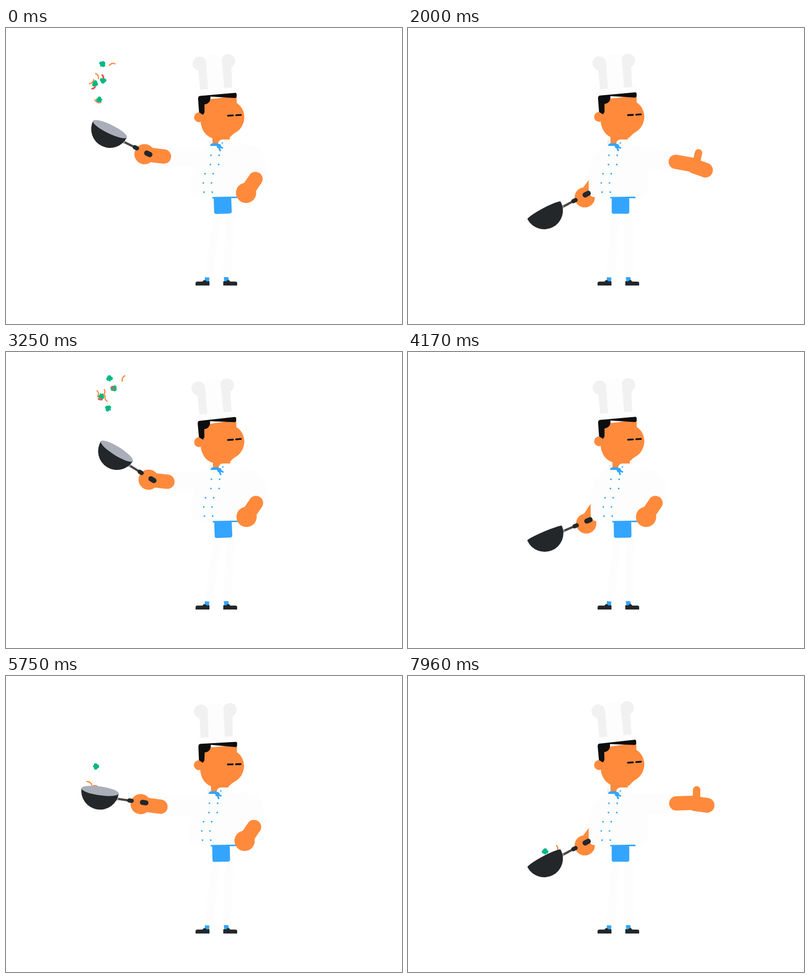
Recreate the animation shown at these times as an HTML page with a canvas. Size 800 by 600 pixels, loop 8000 ms.

```html
<!DOCTYPE html>
<html lang="en">
<head>
<meta charset="utf-8">
<title>Chef</title>
<style>
html, body { margin: 0; width: 100%; height: 100%; overflow: hidden; background: #fff; }
canvas { display: block; }
</style>
</head>
<body>
<canvas id="stage" width="800" height="600"></canvas>
<script>
const ctx = document.getElementById('stage').getContext('2d');
const LOOP = 8000, TOSS = 3000, GESTURE = 6000;
const SKIN = '#ff8a3c', BLUE = '#33a5ff', DARK = '#23272a', HAIR = '#0c0d0e',
      CLOTH = '#fdfdfd', SHADE = '#f1f1f1', GREEN = '#00b884', RED = '#e2574c';

// Periodic monotone cubic through keys [time, ...values].
function track(keys, period) {
  const shift = (k, by) => [k[0] + by, ...k.slice(1)];
  const n = keys.length;
  const ks = [shift(keys[n - 2], -period), shift(keys[n - 1], -period), ...keys,
              shift(keys[0], period), shift(keys[1], period)];
  const rise = (i, c) => (ks[i + 1][c] - ks[i][c]) / (ks[i + 1][0] - ks[i][0]);
  const slope = (i, c) => {
    const a = rise(i - 1, c), b = rise(i, c);
    return a * b > 0 ? 2 * a * b / (a + b) : 0;
  };
  return time => {
    const t = time % period;
    let i = 1;
    while (i < ks.length - 3 && ks[i + 1][0] <= t) i++;
    const h = ks[i + 1][0] - ks[i][0], u = (t - ks[i][0]) / h, v = 1 - u;
    return ks[i].slice(1).map((p, j) => {
      const c = j + 1;
      return p * v * v * (1 + 2 * u) + ks[i + 1][c] * u * u * (3 - 2 * u)
        + h * u * v * (v * slope(i, c) - u * slope(i + 1, c));
    });
  };
}

const bodyAt = track([[0, 0], [250, 1], [710, 0], [1170, -4], [1500, -8], [2050, -8],
  [2500, -6], [2750, -3]], TOSS);

// x, y, tilt in degrees
const headAt = track([[0, 0, 0, 0], [250, 0, 1, -1.2], [710, .5, -2, -3], [1170, -4, 0, 0],
  [1960, -4, -1.5, -1.3], [2000, -4, -1, -.2], [2500, -2, 1, 1.5], [2750, -.5, 1, 1.8]], TOSS);

// bowl x, y, angle, elbow x, y
const panAt = track([
  [0, 210, 205, 26, 319, 260.5], [250, 224, 201, 32, 326, 263],
  [710, 243, 233, 31, 342, 290.5], [1170, 276, 367, -23, 378, 320],
  [1400, 275, 370, -28, 376, 318], [2030, 275, 370, -28, 376, 318],
  [2500, 221, 300, -12, 348, 300], [2670, 184, 246, 2, 309, 270],
  [2750, 190, 233, 8, 312, 265]], TOSS);

// elbow x, y, forearm angle, sleeve bulge
const armAt = track([
  [0, 504, 306, 124, 1], [100, 504, 306, 124, 1], [350, 548, 268, 0, 0],
  [600, 519, 212, -90, 0], [950, 519, 212, -90, 0], [1300, 545, 238, -30, 0],
  [1720, 545, 238, -30, 0], [1960, 550, 258, -2, 0], [2000, 549, 271, 10, 0],
  [2250, 530, 300, 65, .5], [2480, 504, 306, 124, 1], [5980, 504, 306, 124, 1]], GESTURE);

// Flight of each ingredient: kind, then x, y at the four flight times.
const FLIGHT = [-250, 0, 250, 710];
const FOOD = [
  ['broccoli', 182, 184, 195, 73, 209, 53, 246, 158],
  ['broccoli', 184, 232, 180, 113, 193, 90, 217, 180],
  ['broccoli', 194, 234, 196, 107, 218, 74, 226, 191],
  ['broccoli', 200, 238, 188, 146, 206, 114, 229, 206],
  ['carrot', 169, 217, 214, 73, 236, 53, 265, 159],
  ['carrot', 182, 224, 185, 97, 199, 82, 228, 164],
  ['carrot', 176, 234, 174, 110, 186, 84, 206, 172],
  ['carrot', 190, 236, 184, 150, 201, 95, 229, 187],
  ['pepper', 186, 232, 196, 99, 216, 73, 224, 190],
  ['pepper', 180, 234, 177, 122, 190, 96, 219, 183]];

const rad = deg => deg * Math.PI / 180;
function at(x, y, deg, draw) {
  ctx.save();
  ctx.translate(x, y);
  ctx.rotate(rad(deg));
  draw();
  ctx.restore();
}
function disc(x, y, r, color) {
  ctx.fillStyle = color;
  ctx.beginPath();
  ctx.arc(x, y, r, 0, 7);
  ctx.fill();
}
function line(x1, y1, x2, y2, width, color, cap = 'round') {
  stroke(`M${x1} ${y1}L${x2} ${y2}`, width, color, cap);
}
function stroke(d, width, color, cap = 'round') {
  ctx.lineWidth = width;
  ctx.strokeStyle = color;
  ctx.lineCap = cap;
  ctx.stroke(new Path2D(d));
}
function fill(d, color) {
  ctx.fillStyle = color;
  ctx.fill(new Path2D(d));
}
function box(x, y, w, h, r, color) {
  ctx.fillStyle = color;
  ctx.beginPath();
  ctx.roundRect(x, y, w, h, r);
  ctx.fill();
}

function legs(dx) {
  line(428 + dx, 372, 409, 506, 17, CLOTH, 'butt');
  line(454 + dx, 372, 446, 506, 17, CLOTH, 'butt');
  fill('M402 505L411 506L410 514L401 514Z', BLUE);
  fill('M440 505L449 505L451 514L441 514Z', BLUE);
  const shoe = 'M0 522V517Q0 514 4 514H14Q16 510 20 511.5Q22 515 27 513Q28 513 28 515V522Z';
  at(383, 0, 0, () => fill(shoe, DARK));
  ctx.save();
  ctx.translate(467, 0);
  ctx.scale(-1, 1);
  fill(shoe, DARK);
  ctx.restore();
}

function torso() {
  fill('M411 236Q396 238 389 256L375 298Q373 305 373 313V329Q373 343 387 343H480'
    + 'Q492 343 492 331V262Q492 240 474 238Z', CLOTH);
}

function apron(dx) {
  at(437 + dx, 343.5, -2 * (dx + 8) / 8, () => {
    box(-17.5, 0, 35.5, 33, 4, BLUE);
    line(-19, 0, 29, 0, 3, BLUE);
  });
}

function collar() {
  box(417, 208, 35, 28, 0, SKIN);
  fill('M412 239Q408 230 412 227L418 233L417 238Z', SHADE);
  fill('M412 239Q413 234 418 233.5H429V239Z', BLUE);
  fill('M429 238Q427 228 436 226H453Q458 230 459 239Z', CLOTH);
  disc(430, 239.5, 4.5, BLUE);
  line(431, 240, 437, 243, 3.5, BLUE);
  line(430, 241, 432.5, 248, 3.5, BLUE);
  disc(437, 233, 1.6, BLUE);
}

function buttons() {
  [414, 413, 402, 398.5, 400].forEach((x, i) => {
    const y = 258 + i * 18.7;
    disc(x, y, 1.7, BLUE);
    disc(x + 16.6, y, 1.7, BLUE);
  });
}

function head() {
  fill('M397 146L466 138V152C477 159 481 170 481.5 181C481 197 472 208 462 213'
    + 'C456 217 453 221 450 224H421C405 222 394 207 393 188Z', SKIN);
  disc(390, 181, 10, SKIN);
  fill('M388 143Q388 138 393 137L462 131Q466 131 466 135V138Q466 142 462 142L413 139'
    + 'Q414 153 401 155V171L398 176L390 171Z', HAIR);
  line(448.5, 177.7, 458.5, 177.2, 3.6, HAIR);
  line(465, 176.8, 474.5, 176.2, 3.6, HAIR);
  // hat
  disc(391, 72, 14, SHADE);
  disc(449, 67, 14, SHADE);
  fill('M388 78L406 70L410 124L392 125Z', SHADE);
  fill('M436 68L455 76L457 121L439 123Z', SHADE);
  fill('M404 64Q405 55 414 55Q420 50 427 54Q435 54 436 63L441 124H408Z', CLOTH);
  fill('M384 129Q384 126 388 125.5L463 120Q467 120 468 124L467 131L388 138Q385 138 384 134Z', CLOTH);
}

function panArm(dx, bx, by, angle, ex, ey) {
  const c = Math.cos(rad(angle)), s = Math.sin(rad(angle));
  const hx = bx + 85 * c - 15 * s, hy = by + 85 * s + 15 * c;
  line(402 + dx, 262, ex, ey, 39, CLOTH, 'butt');
  line(hx, hy, ex, ey, 29, SKIN);
  disc(hx, hy, 20.5, SKIN);
}

function pan(bx, by, angle) {
  at(bx, by, angle, () => {
    const rim = Math.max(-5, Math.min(9, angle * .4 + 6));
    line(33, 11, 60, 11, 4.5, '#4b4542', 'butt');
    line(31, 11, 39, 11, 6, '#8f969f', 'butt');
    line(61, 11, 66, 11, 8.5, DARK);
    line(88, 11, 95, 11, 10.5, DARK);
    ctx.fillStyle = DARK;
    ctx.beginPath();
    ctx.arc(0, 0, 38, 0, Math.PI);
    ctx.fill();
    ctx.beginPath();
    ctx.ellipse(0, 0, 38, Math.abs(rim), 0, 0, 7);
    ctx.fillStyle = rim > 0 ? '#a9aeb9' : DARK;
    ctx.fill();
  });
}

const ingredient = {
  broccoli() {
    disc(-3, 1, 3.6, GREEN);
    disc(3, 1, 3.6, GREEN);
    disc(0, -2, 4, GREEN);
    line(0, 0, 0, 5, 3.5, GREEN);
  },
  carrot() { stroke('M-6 1Q0 -3 6 2', 2.4, SKIN); },
  pepper() { stroke('M-3 1Q1 1 3 -2', 3.5, RED); }
};

// Cubic through the four flight samples.
function flightPoint(item, axis, t) {
  return FLIGHT.reduce((sum, a, i) => sum + item[1 + 2 * i + axis]
    * FLIGHT.reduce((p, b) => b === a ? p : p * (t - b) / (a - b), 1), 0);
}

function food(phase, rimY) {
  const t = phase > 2700 ? phase - TOSS : phase;
  if (t < 950) FOOD.forEach((item, i) => {
    const x = flightPoint(item, 0, t), y = flightPoint(item, 1, t);
    if (y < rimY + 8) at(x, y, 40 + i * 75 + t * (i % 2 ? .16 : -.2), ingredient[item[0]]);
  });
  if (phase > 1840 && phase < 2000) {
    const hop = 24 * Math.sin((phase - 1840) / 160 * Math.PI);
    at(277, 372 - hop, 0, ingredient.broccoli);
    at(302, 366 - hop, 80, ingredient.carrot);
  }
}

const hands = {
  fist() {
    line(0, 0, 34, 0, 29, SKIN);
    disc(34, 0, 20.5, SKIN);
  },
  ok() {
    line(0, 0, 28, 2, 29, SKIN);
    disc(31, -7, 16, SKIN);
    line(26, 7, 66, 19, 20, SKIN);
    disc(47, -3, 16.5, SKIN);
    disc(45, -2, 5.2, '#fff');
  },
  palm() {
    line(0, 0, 35, 0, 29, SKIN);
    line(38, 2, 62, 6, 30, SKIN);
    line(41, -4, 42, -26, 15, SKIN);
  }
};

function gestureArm(t, dx) {
  const phase = t % GESTURE;
  const [x, ey, angle, bulge] = armAt(t);
  const ex = x + dx, sx = 467 + dx, sy = 261;
  const cx = (sx + ex) / 2 + 26 * bulge, cy = (sy + ey) / 2 - 39 * bulge;
  stroke(`M${sx} ${sy}Q${cx} ${cy} ${ex} ${ey}`, 42, CLOTH, 'butt');
  const pose = phase < 200 || phase > 2250 ? 'fist' : phase < 1050 ? 'ok' : 'palm';
  at(ex, ey, angle, hands[pose]);
}

function draw(t) {
  const [dx] = bodyAt(t), [hx, hy, tilt] = headAt(t);
  const [bx, by, angle, ex, ey] = panAt(t);
  ctx.fillStyle = '#fff';
  ctx.fillRect(0, 0, 800, 600);
  legs(dx);
  panArm(dx, bx, by, angle, ex, ey);
  apron(dx);
  at(dx, 0, 0, torso);
  line(418 + dx, 344, 466 + dx, 343.2, 3, BLUE);
  at(430 + hx, 180 + hy, tilt, () => {
    ctx.translate(-430, -180);
    head();
  });
  at(dx, 0, 0, () => { collar(); buttons(); });
  food(t % TOSS, by);
  pan(bx, by, angle);
  gestureArm(t, dx);
}

const start = performance.now();
function frame() {
  draw((performance.now() - start) % LOOP);
  requestAnimationFrame(frame);
}
frame();
</script>
</body>
</html>
```
